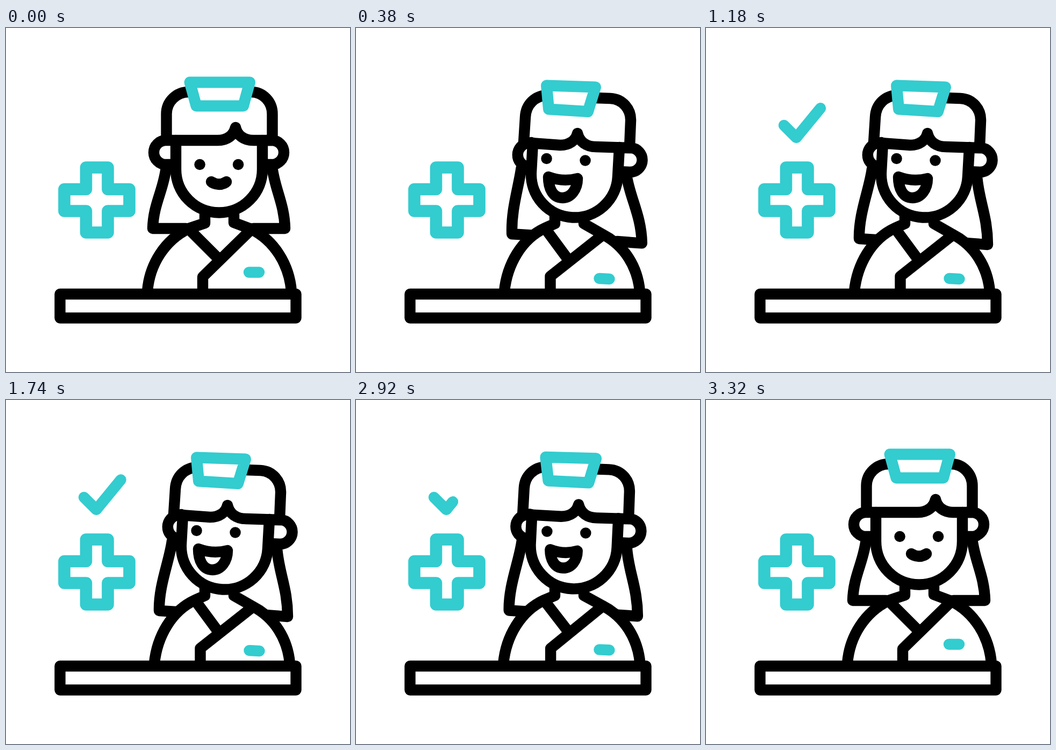
An HTML page that plays this animation: 640 by 640 pixels, repeating every 3600 ms.

```html
<!DOCTYPE html>
<html lang="en">
<head>
<meta charset="utf-8">
<title>Nurse at the desk</title>
<style>
html, body { margin: 0; height: 100%; overflow: hidden; background: #fff; }
svg { display: block; width: 100vw; height: 100vh; }
path { stroke: #000; stroke-width: 20.4; stroke-linecap: round; stroke-linejoin: round; fill: none; }
</style>
</head>
<body>
<svg id="stage" viewBox="0 0 640 640"></svg>
<script>
const TEAL = '#33cccf', BLACK = '#000', LOOP = 3600;
const stage = document.getElementById('stage');

function addPath(d, style = '') {
  const path = document.createElementNS('http://www.w3.org/2000/svg', 'path');
  path.setAttribute('d', d);
  path.style.cssText = style;
  return stage.appendChild(path);
}

// Blend two path strings that share the same commands.
function mix(from, to, p) {
  const target = to.match(/[\d.]+/g);
  let i = 0;
  return from.replace(/[\d.]+/g, n => +n + (target[i++] - n) * p);
}

function ease(t, start, end) {
  const u = Math.min(1, Math.max(0, (t - start) / (end - start)));
  return u * u * (3 - 2 * u);
}

const tilting = [];
function addTilting(rest, tilted, style) {
  tilting.push({ path: addPath(rest, style), rest, tilted });
}

const hair = {
  rest: 'M298 258 C294 300 274 327 273 373 L335 373 M495 258 C500 300 518 327 519 373 L460 373',
  swung: 'M309 262 C303 300 291 340 293 385 L334 388 M504 272 C509 315 533 350 534 405 L490 401',
  settled: 'M309 262 C304 300 284 345 285 392 L316 394 M504 275 C507 320 524 350 524 403 L482 400'
};
hair.path = addPath(hair.rest);

const WHITE = 'fill:#fff';

// Body with neck, then collar and badge
addTilting(
  'M263 490 C267 440 295 395 340 373 L370 363 L370 335 L424 335 L424 362 L456 374 C499 395 527 440 531 490',
  'M276 490 C281 440 308 392 352 372 L370 364 L370 340 L424 340 L424 364 L459 384 C500 405 524 445 528 490', WHITE);
addTilting('M340 374 L397 431 M456 375 L366 463 L366 490', 'M352 373 L397 434 M459 385 L361.5 462 L361.5 490');
addTilting('M452 454.5 L471 454.5', 'M452.5 466 L471.5 467', 'stroke:' + TEAL);

// Ears
addTilting(
  'M308 209 L297.5 209 A22.3 22.3 0 0 0 297.5 254 L316 254 M485 209 L494.5 209 A22.3 22.3 0 0 1 494.5 254 L477 254',
  'M326 213 L320 214 A22.3 22.3 0 0 0 319 258 L328 259 M498 223 L511 223 A22.3 22.3 0 0 1 509 268 L488 267');

// Face, cap of hair, fringe
addTilting(
  'M316 209 L316 263 A80.5 80.5 0 0 0 477 263 L477 209',
  'M329 214 L326 268 A80.5 80.5 0 0 0 487 276 L490 222', WHITE);
addTilting(
  'M298.5 207 L298.5 160 C298.5 137 317 119 340 119 M450 119 L456 119 C478 119 495.5 137 495.5 160 L495.5 207',
  'M312 213 L315 166 C316 142 333 126 356 125 M444 130 L473 131 C496 132 512 151 511 173 L509 222');
addTilting(
  'M308 209 L394 209 C412 209 424 199 427 185 C430 199 442 209 460 209 L495 209',
  'M325 214 L380 218 C397 218 409 209 412 196 C416 212 429 221 446 221 L510 223');

// Eyes and mouth
addTilting('M360.5 254 L360.6 254 M432 254 L432.1 254', 'M354.5 243 L354.6 243 M426.5 246.5 L426.6 246.5');
addTilting(
  'M382 286 Q396 295 410 286 C410 287 404 291 396 291 C389 291 382 287 382 286 Z',
  'M358 277 Q385 287 412 280 C412 300 400 316 384 316 C366 316 358 298 358 277 Z');

// Hat
addTilting(
  'M342 101 L453.5 101 L441.5 145 L354 145 Z',
  'M354.5 107 L445.5 110 L431.5 155.5 L358.5 151 Z', WHITE + ';stroke-width:21;stroke:' + TEAL);

addPath('M100.5 495 H539.5 V539.5 H100.5 Z', WHITE);
const cross = addPath('M149 259.5 H189.5 V300 H229.5 V340.5 H189.5 V380.5 H149 V340.5 H108.5 V300 H149 Z');
const check = addPath('M145 181 L168 204 L213.5 148.5');
check.setAttribute('pathLength', 1);

function render(t) {
  const tilt = ease(t, 0, 380) - ease(t, 2800, 3320);
  for (const { path, rest, tilted } of tilting) path.setAttribute('d', mix(rest, tilted, tilt));

  let strands = mix(hair.rest, hair.swung, ease(t, 0, 500));
  strands = mix(strands, hair.settled, ease(t, 500, 1100));
  hair.path.setAttribute('d', mix(strands, hair.rest, ease(t, 2880, 3320)));

  const dark = [[1460, 1720], [2000, 2300], [2580, 2860]].some(([on, off]) => t >= on && t < off);
  cross.style.stroke = check.style.stroke = dark ? BLACK : TEAL;
  cross.style.strokeWidth = dark ? 20.4 : 22.6;

  const drawn = ease(t, 850, 1200) - ease(t, 2800, 3040);
  check.style.strokeDasharray = drawn + ' 9';
  check.style.visibility = drawn > 0 ? 'visible' : 'hidden';
}

function tick() {
  render(performance.now() % LOOP);
  requestAnimationFrame(tick);
}
tick();
</script>
</body>
</html>
```
